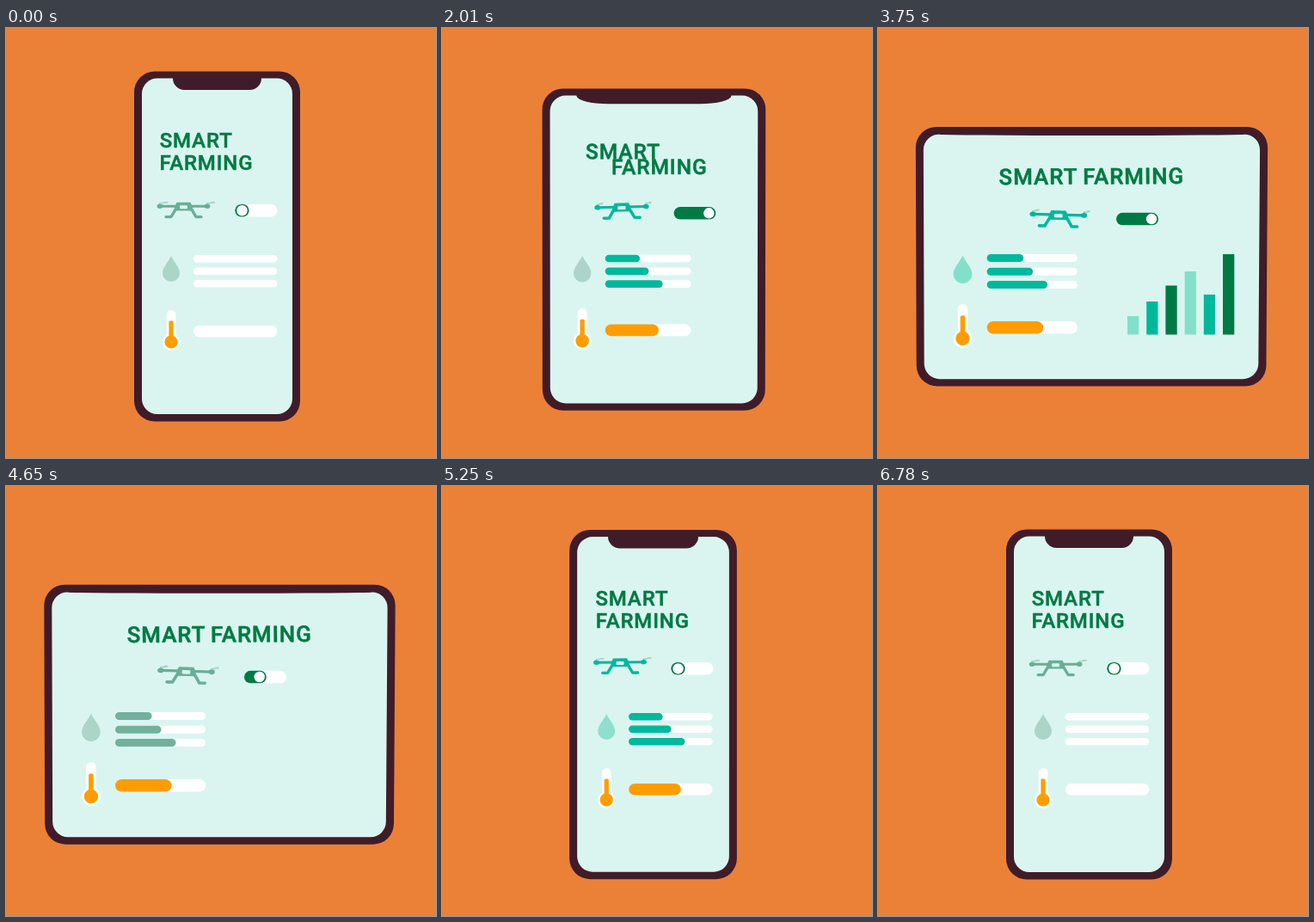
Write an HTML page with a canvas that moves like this. It is 500 by 500 pixels and loops after 6810 ms.

```html
<!DOCTYPE html>
<html lang="en">
<head>
<meta charset="utf-8">
<title>Smart farming</title>
<style>
html, body { margin: 0; width: 100%; height: 100%; overflow: hidden; background: #eb8137; }
canvas { display: block; }
</style>
</head>
<body>
<canvas id="stage" width="500" height="500"></canvas>
<script>
const g = document.getElementById('stage').getContext('2d');
const LOOP = 6810;
const ORANGE = '#eb8137', SHELL = '#401c29', SCREEN = '#daf5f0', DARK = '#007a45',
  TEAL = '#00b89c', MINT = '#82e0ca', GREY = '#6aae95', PALE = '#abd5c7', AMBER = '#ff9d00';

const lerp = (a, b, k) => a + (b - a) * k;

// cubic-bezier(.4, 0, .2, 1), solved by bisection
function ease(x) {
  if (x <= 0) return 0;
  if (x >= 1) return 1;
  let lo = 0, hi = 1;
  for (let i = 0; i < 20; i++) {
    const s = (lo + hi) / 2, r = 1 - s;
    if (1.2 * r * r * s + 0.6 * r * s * s + s ** 3 < x) lo = s; else hi = s;
  }
  return 3 * (1 - lo) * lo * lo + lo ** 3;
}
const ramp = (t, start, length) => ease((t - start) / length);
const pulse = (t, on, off, length) => ramp(t, on, length) - ramp(t, off, length);

function pill(x, y, w, h, color, r = h / 2) {
  if (w <= 0) return;
  g.fillStyle = color;
  g.beginPath();
  g.roundRect(x, y, w, h, Math.min(r, w / 2));
  g.fill();
}

function ellipse(x, y, rx, ry, color) {
  g.fillStyle = color;
  g.beginPath();
  g.ellipse(x, y, rx, ry, 0, 0, Math.PI * 2);
  g.fill();
}

function at(x, y, scale, draw, angle = 0) {
  g.save();
  g.translate(x, y);
  g.rotate(angle);
  g.scale(scale, scale);
  draw();
  g.restore();
}

// Rounded quad whose lower right corner leans in by `lean`
function panel(l, t, r, b, lean, radius, color) {
  const mid = (l + r) / 2;
  g.fillStyle = color;
  g.beginPath();
  g.moveTo(mid, t);
  g.arcTo(r, t, r - lean, b, radius);
  g.arcTo(r - lean, b, l + lean / 2, b, radius);
  g.arcTo(l + lean / 2, b, l, t, radius);
  g.arcTo(l, t, r, t, radius);
  g.fill();
}

function device(m) {
  const mix = (a, b) => lerp(a, b, m);
  panel(mix(149, 43.8), mix(50.5, 115), mix(342, 453.3), mix(457.5, 416.5), 2 * m, 24, SHELL);
  const top = mix(58.5, 123.7);
  panel(mix(158, 52.8), top, mix(333, 444.2), mix(449, 408.2), 2 * m, 18, SCREEN);

  // The notch flattens into a barely bent edge
  const l = mix(194, 72), r = mix(297, 425), depth = mix(13.5, 1.3);
  const corner = { x: mix(13.5, (r - l) / 2), y: depth };
  g.fillStyle = SHELL;
  g.beginPath();
  g.roundRect(l, top - 1, r - l, depth + 1, [0, 0, corner, corner]);
  g.fill();
}

function title(m, color) {
  g.fillStyle = g.strokeStyle = color;
  g.lineWidth = 0.5;
  g.lineJoin = 'round';
  g.font = '500 24px Roboto, Inter, sans-serif';
  g.letterSpacing = '0.85px';
  const word = (text, x0, y0, x1, y1) =>
    at(lerp(x0, x1, m), lerp(y0, y1, m), 1 + 0.08 * m, () => {
      g.fillText(text, 0, 0);
      g.strokeText(text, 0, 0);
    }, -0.006 * m);
  word('SMART', 178.7, 139, 140.6, 182.2);
  word('FARMING', 178.4, 165, 238.3, 181.7);
}

function drone(t, m, muted) {
  const a = t / LOOP * Math.PI * 4, color = muted ? GREY : TEAL;
  const c = Math.cos(t / LOOP * Math.PI * 26);
  const reach = Math.sign(c) * Math.sqrt(Math.abs(c)) * 9.5;
  const x = lerp(206.5, 211, m) - 2 * Math.sin(a);
  const y = lerp(208.3, 218.5, m) - 1.25 * (1 - Math.cos(a));
  at(x, y, 1 + 0.08 * m, () => {
    g.strokeStyle = color;
    g.lineCap = g.lineJoin = 'round';
    g.lineWidth = 3;
    g.beginPath();
    g.moveTo(-27, -1);
    g.lineTo(27, -1);
    g.stroke();
    g.lineWidth = 3.3;
    for (const side of [-1, 1]) {
      g.beginPath();
      g.moveTo(side * 9, 2);
      g.lineTo(side * 14.5, 11.3);
      g.lineTo(side * 20.5, 11.3);
      g.stroke();
      const hub = side * 27.5;
      ellipse(hub, -1, 3.4, 2.7, color);
      pill(hub - 0.5, -5, 1, 4, color);
      ellipse(hub + reach * 0.25, -4.6, Math.abs(reach) * 0.3, 0.9, PALE);
      ellipse(hub + reach * 0.7, -5.4, Math.abs(reach) * 0.3, 1.1, PALE);
    }
    g.fillStyle = color;
    g.beginPath();
    g.moveTo(-8, -5.5);
    g.lineTo(8, -5.5);
    g.lineTo(10.5, 0);
    g.lineTo(9.5, 4.3);
    g.lineTo(-9.5, 4.3);
    g.lineTo(-10.5, 0);
    g.fill();
    pill(-4.5, -2, 9, 4, SCREEN, 1);
  }, 0.042 * Math.sin(a));
}

function toggle(m, on) {
  const x = lerp(266.3, 277, m), y = lerp(205, 214.8, m);
  pill(x, y, 49, 14.5, '#fff');
  pill(x, y, 16.3 + 32.7 * on, 14.5, DARK);
  ellipse(x + 8.2 + 32.8 * on, y + 7.25, 6.2, 6.2, '#fff');
}

function drop(m, color) {
  at(lerp(192, 98.5, m), lerp(265, 264.5, m), 1 + 0.08 * m, () => {
    g.fillStyle = color;
    g.beginPath();
    g.moveTo(0, 0);
    g.bezierCurveTo(3, 7, 10, 13, 10, 20);
    g.arc(0, 20, 10, 0, Math.PI);
    g.bezierCurveTo(-10, 13, -3, 7, 0, 0);
    g.fill();
  });
}

function thermometer(m) {
  at(lerp(192, 98.5, m), lerp(365, 361, m), 1 + 0.08 * m, () => {
    pill(-5.3, -37, 10.6, 42, '#fff');
    ellipse(0, 0, 10, 10, '#fff');
    pill(-2.6, -24.5, 5.2, 26, AMBER, 1.5);
    ellipse(0, 0, 7.6, 7.6, AMBER);
  });
}

function gauges(m, fill, color) {
  const x = lerp(217.8, 126.6, m), s = 1 + 0.08 * m;
  const gauge = (y0, y1, h, part, tint) => {
    const y = lerp(y0, y1, m);
    pill(x, y, 97.5 * s, h * s, '#fff');
    pill(x, y, 97.5 * s * part * fill, h * s, tint);
  };
  gauge(264, 263, 8.4, 0.405, color);
  gauge(278.5, 278.7, 8.4, 0.508, color);
  gauge(293, 294, 8.4, 0.67, color);
  gauge(346, 341, 13.5, 0.623, AMBER);
}

function chart(t) {
  [21.5, 38.5, 57, 73.5, 46.5, 93.5].forEach((height, i) => {
    const h = height * pulse(t, 2360 + i * 90, 3950 + (5 - i) * 30, 500);
    g.fillStyle = [MINT, TEAL, DARK][i % 3];
    g.fillRect(290 + i * 22.2, 356.5 - h, 13.3, h);
  });
}

function draw(t) {
  const within = (a, b) => t >= a && t < b;
  const m = pulse(t, 1812, 4620, 715);
  const fill = pulse(t, 250, 5700, 750);
  const on = pulse(t, 1660, 4470, 400);
  const muted = fill < 0.3 || within(4560, 4800);

  g.fillStyle = ORANGE;
  g.fillRect(0, 0, 500, 500);
  device(m);
  title(m, fill > 0.3 && t < 1700 ? '#2d946a' : DARK);
  drone(t, m, muted);
  toggle(m, on);
  drop(m, muted || within(1812, 2700) ? PALE : m > 0.5 ? MINT : '#8fdfcf');
  gauges(m, fill, within(4560, 4800) ? '#72b19b' : TEAL);
  thermometer(m);
  chart(t);
}

const start = performance.now();
function tick() {
  draw((performance.now() - start) % LOOP);
  requestAnimationFrame(tick);
}
tick();
</script>
</body>
</html>
```
